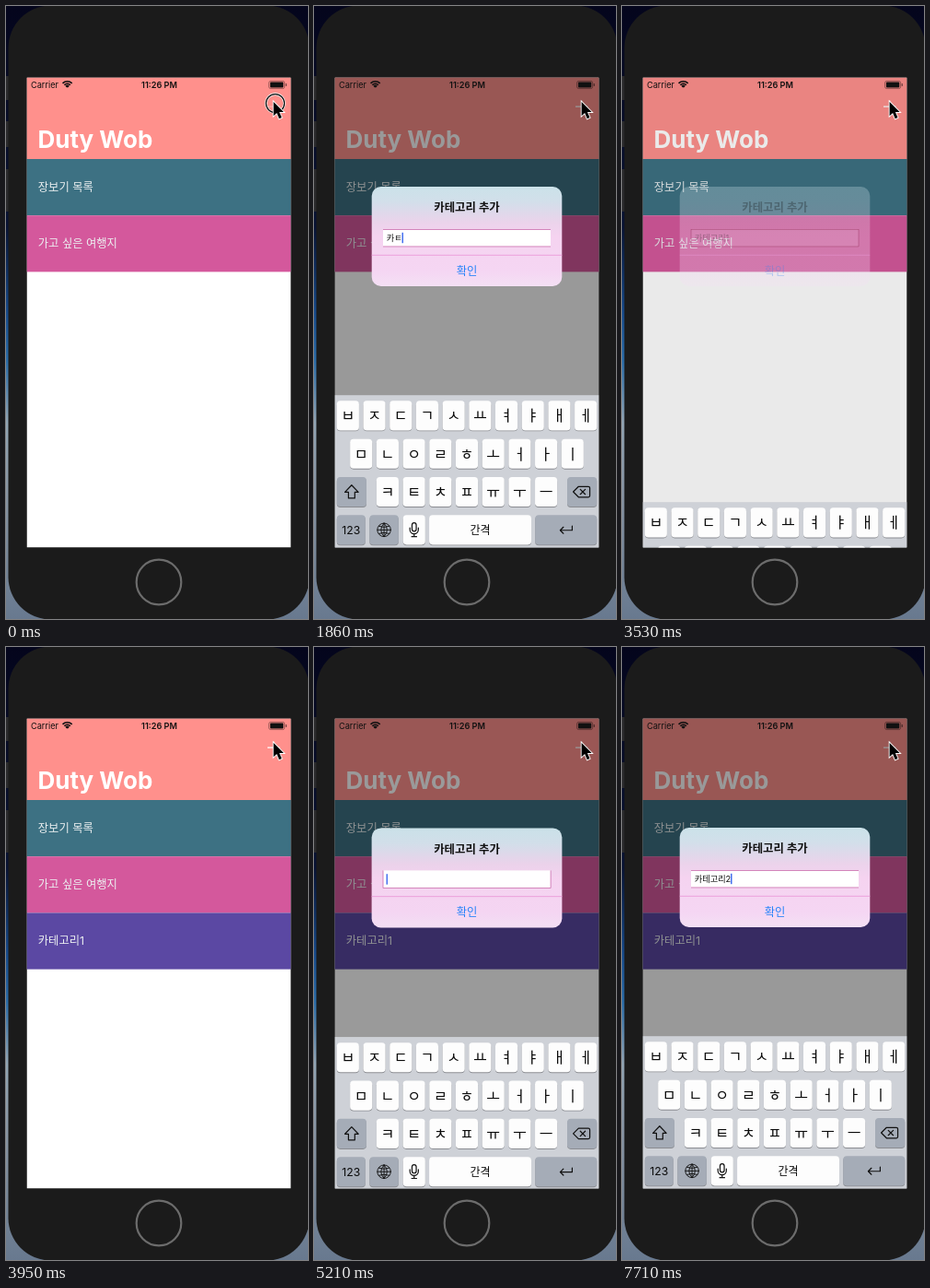
An HTML page with a canvas that plays this animation: 328 px wide and 665 px high, repeating every 8000 ms.

```html
<!DOCTYPE html>
<html lang="ko">
<head>
<meta charset="utf-8">
<style>
  html, body { margin: 0; width: 100%; height: 100%; overflow: hidden; background: #1b1b1b; }
  canvas { display: block; width: 328px; height: 665px; }
</style>
</head>
<body>
<canvas id="stage"></canvas>
<script>
const W = 328, H = 665, LOOP = 8000;
const canvas = document.getElementById('stage');
const ctx = canvas.getContext('2d');
const dpr = window.devicePixelRatio || 1;
canvas.width = W * dpr;
canvas.height = H * dpr;

const FONT = 'Inter, "Noto Sans CJK KR", "Noto Sans CJK", sans-serif';
const SCREEN = { x: 22.5, y: 77.5, w: 287, h: 510 };
const PT = SCREEN.w / 375;
const KEYBOARD_H = 216 * PT;

// Screen updates arrive at these moments; the picture holds in between.
const TICKS = [0, 200, 410, 610, 820, 1030, 1240, 1860, 2280, 2490, 2690, 3110, 3530, 3740,
  3950, 5000, 5210, 5420, 5620, 5830, 6250, 6670, 6880, 7080, 7290, 7710];
const OPEN_1 = 200, CLOSE = 3394, OPEN_2 = 4800, ADDED = 3950;
const TYPING = [[0, ''], [1030, 'ㅋ'], [1240, '카'], [1860, '카ㅌ'], [2280, '카테'], [2490, '카테고'],
  [2690, '카테고리'], [3110, '카테고리1'], [3950, ''], [5620, 'ㅋ'], [5830, '카'], [6250, '카ㅌ'],
  [6670, '카테'], [6880, '카테고'], [7080, '카테골'], [7290, '카테고리'], [7710, '카테고리2']];

const typedAt = t => TYPING.filter(([at]) => at <= t).pop()[1];

// Critically damped spring: the share of travel still left.
function springLeft(ms) {
  const x = 0.018 * Math.max(0, ms);
  const left = (1 + x) * Math.exp(-x);
  return left < 0.002 ? 0 : left;
}

function rect(x, y, w, h, color) {
  ctx.fillStyle = color;
  ctx.fillRect(x, y, w, h);
}

function round(x, y, w, h, r, color) {
  ctx.fillStyle = color;
  ctx.beginPath();
  ctx.roundRect(x, y, w, h, r);
  ctx.fill();
}

function text(str, x, y, size, color, weight = 400, align = 'left') {
  ctx.font = `${weight} ${size}px ${FONT}`;
  ctx.textAlign = align;
  ctx.textBaseline = 'alphabetic';
  ctx.fillStyle = color;
  ctx.fillText(str, x, y);
}

function strokePath(d, color, width) {
  ctx.strokeStyle = color;
  ctx.lineWidth = width;
  ctx.stroke(new Path2D(d));
}

function circle(x, y, r, color, width) {
  ctx.beginPath();
  ctx.arc(x, y, r, 0, Math.PI * 2);
  ctx.strokeStyle = color;
  ctx.lineWidth = width;
  ctx.stroke();
}

function gradient(y0, y1, stops) {
  const g = ctx.createLinearGradient(0, y0, 0, y1);
  stops.forEach(([at, color]) => g.addColorStop(at, color));
  return g;
}

function drawPhone() {
  rect(0, 0, W, H, gradient(0, H, [[0, '#04051c'], [0.36, '#081334'], [0.5, '#174b8c'],
    [0.58, '#2c6eaa'], [0.68, '#92a5b5'], [0.8, '#8794a3'], [1, '#68798f']]));
  for (const [y, h] of [[76, 26], [125, 28], [177, 46]]) rect(0, y, 4, h, '#2b2b2d');
  round(2.5, -0.5, 327, 666, 46, '#1b1b1b');
  circle(166, 625, 24.3, '#6c6c6c', 2.2);
}

function drawStatusBar() {
  text('Carrier', 27, 88.7, 9.2, '#111');
  ctx.lineCap = 'butt';
  for (const r of [2, 4.6, 7.2]) {
    ctx.beginPath();
    ctx.arc(66.6, 89, r, -Math.PI * 0.75, -Math.PI * 0.25);
    ctx.strokeStyle = '#111';
    ctx.lineWidth = r === 2 ? 2.4 : 1.6;
    ctx.stroke();
  }
  text('11:26 PM', 166.5, 88.7, 9.2, '#111', 600, 'center');
  ctx.beginPath();
  ctx.roundRect(285.6, 81.4, 17, 8.2, 2);
  ctx.strokeStyle = 'rgba(0,0,0,.45)';
  ctx.lineWidth = 0.8;
  ctx.stroke();
  round(286.9, 82.6, 14.4, 5.8, 1, '#111');
  round(303.6, 84, 1.3, 3, 0.6, 'rgba(0,0,0,.5)');
}

function drawPage(t, dim) {
  const cells = [['장보기 목록', '#3d7183'], ['가고 싶은 여행지', '#d4589c']];
  if (t >= ADDED) cells.push(['카테고리1', '#5b48a3']);
  rect(SCREEN.x, SCREEN.y, SCREEN.w, SCREEN.h, '#fff');
  rect(SCREEN.x, SCREEN.y, SCREEN.w, 88.5, '#ff908c');
  text('Duty Wob', 34.5, 154, 26, '#fff', 700);
  cells.forEach(([label, color], i) => {
    const y = 166 + i * 61.2;
    rect(SCREEN.x, y, SCREEN.w, 61.2, color);
    text(label, 34.8, y + 35, 12.3, '#ecf0f1');
  });
  const pressed = t < 410;
  strokePath('M284 109.2h13.4M290.7 102.5v13.4', pressed ? 'rgba(255,255,255,.3)' : '#fff', 1.2);
  rect(SCREEN.x, SCREEN.y, SCREEN.w, SCREEN.h, `rgba(0,0,0,${dim})`);
}

function drawAlert(typed, shown, drop, scale) {
  const settled = drop === 0;
  ctx.save();
  ctx.translate(166, 250 + drop);
  ctx.scale(scale, scale);
  ctx.translate(-166, -250);
  ctx.globalAlpha = shown;
  round(62.7, 196, 206.6, 108, 10, gradient(196, 304, [[0, '#cbe2e9'], [0.15, '#d2dfea'],
    [0.36, '#ebd3eb'], [0.5, '#f5d3f0'], [0.85, '#f5d6f3'], [1, '#f4e0f4']]));
  text('카테고리 추가', 166, 223.3, 12.4, '#111', 600, 'center');
  ctx.globalAlpha = shown * shown;
  rect(75, 242, 182, 19, '#fff');
  ctx.globalAlpha = Math.min(1, shown * 1.6);
  const edge = shown < 0.5 ? '#9c3560' : '#cf78b4';
  rect(75, 260.5, 182, 0.9, edge);
  if (settled) rect(75, 242, 182, 0.9, edge);
  if (!settled || shown < 0.5) {
    rect(74.6, 242, 0.9, 19, edge);
    rect(256.6, 242, 0.9, 19, edge);
  }
  rect(62.7, 269.8, 206.6, 0.9, '#ec9bd9');
  ctx.globalAlpha = shown;
  text(typed, 78.8, 254.5, 9.2, '#111');
  if (shown > 0.5) {
    const caretX = 78.6 + ctx.measureText(typed).width;
    rect(caretX, 245.8, 1.5, 11.4, '#4470ef');
  }
  text('확인', 166, 291.5, 12.3, '#2583f9', 400, 'center');
  ctx.restore();
}

function key(x, y, w, label, { dark = false, size = 21, weight = 500 } = {}) {
  round(x, y + 1.2, w, 42, 5, '#8a8c91');
  round(x, y, w, 42, 5, dark ? '#a5acb7' : '#fdfdfd');
  if (label) text(label, x + w / 2, y + 21 + size * 0.37, size, '#0a0a0a', weight, 'center');
}

function drawKeyboard(top) {
  ctx.save();
  ctx.translate(SCREEN.x, top);
  ctx.scale(PT, PT);
  rect(0, 0, 375, 220, '#ced1d7');
  const rows = [['ㅂㅈㄷㄱㅅㅛㅕㅑㅐㅔ', 3], ['ㅁㄴㅇㄹㅎㅗㅓㅏㅣ', 21.75], ['ㅋㅌㅊㅍㅠㅜㅡ', 59.25]];
  rows.forEach(([jamo, x], row) =>
    [...jamo].forEach((ch, i) => key(x + i * 37.5, 8 + row * 54, 31.5, ch)));
  const dark = { dark: true, size: 16, weight: 400 };
  key(3, 116, 42, '', dark);
  key(330, 116, 42, '', dark);
  key(3, 170, 40.5, '123', dark);
  key(49.5, 170, 41, '', dark);
  key(97, 170, 31.5, '');
  key(134, 170, 145, '간격', { size: 15.7, weight: 400 });
  key(284.5, 170, 87.5, '', dark);

  ctx.lineJoin = ctx.lineCap = 'round';
  const icons = [
    'M24 127.5l9.5 10h-5v8.5h-9v-8.5h-5z',
    'M346 129.5h14q2 0 2 2v11q0 2-2 2h-14l-7.5-7.5zM348.5 133.5l7 7m0-7l-7 7',
    'M337 185.5v6h-17m4.5-4.5l-4.5 4.5l4.5 4.5',
    'M109.7 184a3 3 0 0 1 6 0v6a3 3 0 0 1-6 0zM106.7 188v2.5a6 6 0 0 0 12 0v-2.5M112.7 196.5v4m-3.5 0h7'
  ];
  icons.forEach(d => strokePath(d, '#111', 1.6));
  circle(70, 191, 9.5, '#111', 1.2);
  strokePath('M60.5 191h19M70 181.5v19M62.5 185.7q7.5 3 15 0M62.5 196.3q7.5-3 15 0' +
    'M70 181.5q-9 9.5 0 19M70 181.5q9 9.5 0 19', '#111', 1.2);
  ctx.restore();
}

function drawPointer(clicking) {
  if (clicking) {
    circle(292.4, 105.6, 10, '#fff', 2.6);
    circle(292.4, 105.6, 10, '#111', 1.3);
  }
  const arrow = new Path2D('M290.6 104v15.2l3.5-3.2l2.6 6.2l2.8-1.2l-2.6-6h4.7z');
  ctx.lineJoin = 'miter';
  ctx.strokeStyle = '#fff';
  ctx.lineWidth = 1.8;
  ctx.stroke(arrow);
  ctx.fillStyle = '#000';
  ctx.fill(arrow);
}

function draw(time) {
  const t = TICKS.filter(tick => tick <= time).pop();
  const closing = t >= CLOSE && t < OPEN_2;
  const left = springLeft(t - (closing ? CLOSE : t >= OPEN_2 ? OPEN_2 : OPEN_1));
  const shown = closing ? left : 1 - left;

  ctx.setTransform(dpr, 0, 0, dpr, 0, 0);
  ctx.lineCap = 'butt';
  drawPhone();
  ctx.save();
  ctx.beginPath();
  ctx.rect(SCREEN.x, SCREEN.y, SCREEN.w, SCREEN.h);
  ctx.clip();
  drawPage(t, 0.4 * shown ** 1.3);
  drawStatusBar();
  if (shown > 0) {
    const entering = closing ? 0 : left;
    drawAlert(typedAt(t), shown, entering * KEYBOARD_H / 2, 1 + 0.15 * entering);
    drawKeyboard(SCREEN.y + SCREEN.h - KEYBOARD_H * shown);
  }
  ctx.restore();
  drawPointer(t < 200);
}

const start = performance.now();
function loop() {
  draw((performance.now() - start) % LOOP);
  requestAnimationFrame(loop);
}
loop();
</script>
</body>
</html>
```
